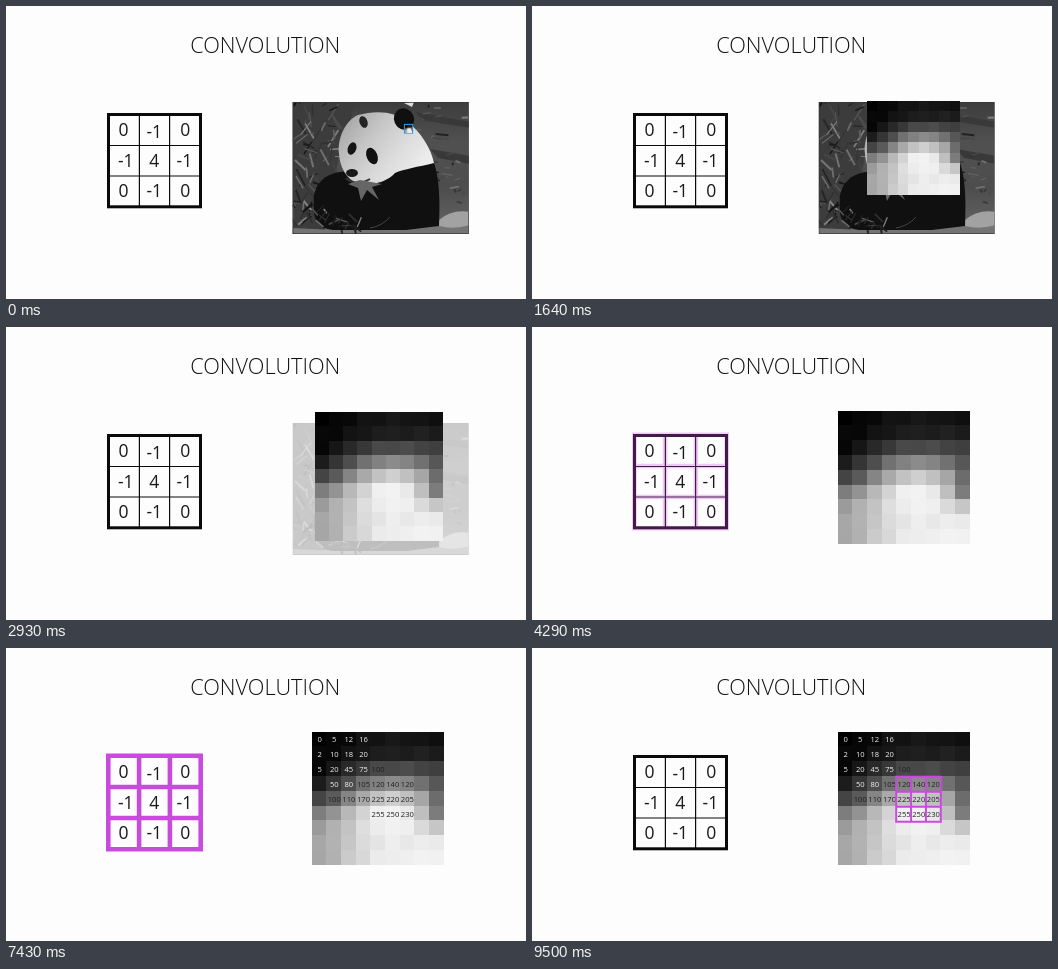
Animation of 520 by 293 pixels, one loop 10 s. Source, as an HTML page:

```html
<!DOCTYPE html>
<html lang="en">
<head>
<meta charset="utf-8">
<title>Convolution</title>
<style>
  html, body { margin: 0; width: 100%; height: 100%; overflow: hidden; background: #fefdfe; }
  svg { display: block; width: 520px; height: 293px; }
  text { font-family: "Open Sans", "Noto Sans", sans-serif; text-anchor: middle; }
</style>
</head>
<body>
<svg viewBox="0 0 520 293">
  <defs>
    <clipPath id="frame"><rect x="286.7" y="96" width="176" height="132"/></clipPath>
    <linearGradient id="ground" x1="0" y1="0" x2="0" y2="1">
      <stop offset="0" stop-color="#3c3c3c"/>
      <stop offset=".3" stop-color="#505050"/>
      <stop offset=".65" stop-color="#4d4d4d"/>
      <stop offset="1" stop-color="#686868"/>
    </linearGradient>
    <linearGradient id="fur" x1="0" y1="0" x2="1" y2=".6">
      <stop offset="0" stop-color="#9c9c9c"/>
      <stop offset=".4" stop-color="#c6c6c6"/>
      <stop offset=".7" stop-color="#dcdcdc"/>
      <stop offset="1" stop-color="#eee"/>
    </linearGradient>
    <linearGradient id="edge" gradientUnits="userSpaceOnUse" y1="0" y2="0">
      <stop offset="0" stop-color="#fff"/>
      <stop offset="1" stop-color="#000"/>
    </linearGradient>
    <mask id="wipe" maskUnits="userSpaceOnUse" x="300" y="80" width="145" height="140">
      <rect x="300" y="80" width="145" height="140" fill="url(#edge)"/>
    </mask>
  </defs>

  <rect width="520" height="293" fill="#fefdfe"/>
  <text x="259.2" y="46.8" font-size="21.75" font-weight="300" fill="#111">CONVOLUTION</text>

  <g id="photo" clip-path="url(#frame)">
    <rect x="286" y="95" width="178" height="134" fill="url(#ground)"/>
    <path d="M286 95H350L333 150 318 228H286Z" fill="#3c3c3c"/>
    <path d="M410 106L464 116V122L415 114ZM424 143L464 150V158L432 152Z" fill="#393939"/>
    <g id="leaves"></g>
    <path d="M286 228V222L330 224 400 221 433 214 464 208V228Z" fill="#747474"/>
    <path d="M433 214Q446 203 464 206V219Q448 224 433 220Z" fill="#a2a2a2"/>
    <path d="M334 166C318 168 306 180 308 198C306 214 314 224 330 224H400L433 220C434 198 434 172 427 154L380 160Z" fill="#101010"/>
    <path d="M333 148C331 132 340 114 352 109C370 104 390 105 403 117C415 127 425 142 428 157C412 161 398 163 389 167C380 177 364 180 352 177C340 174 334 160 333 148Z" fill="url(#fur)"/>
    <ellipse cx="398" cy="113" rx="10" ry="11" fill="#101010" transform="rotate(-25 398 113)"/>
    <path d="M398 97L408 96 406 101Z" fill="#ddd"/>
    <ellipse cx="357.5" cy="116" rx="4" ry="6" fill="#242424" transform="rotate(-20 357.5 116)"/>
    <ellipse cx="346" cy="142.5" rx="4.2" ry="6.5" fill="#151515" transform="rotate(20 346 142.5)"/>
    <ellipse cx="366" cy="150" rx="5.4" ry="8.5" fill="#111" transform="rotate(-22 366 150)"/>
    <ellipse cx="346" cy="167" rx="6" ry="4" fill="#191919"/>
    <path d="M340 172Q350 181 364 173" fill="none" stroke="#333" stroke-width="2"/>
    <path d="M342 178L354 174 376 178 366 181 373 194 361 184 355 195 352 182Z" fill="#666"/>
    <path d="M364 222Q376 220 384 211" fill="none" stroke="#444"/>
    <g id="grass"></g>
    <rect x="287" y="96.3" width="175.4" height="131.4" fill="none" stroke="#333" stroke-width=".7"/>
  </g>
  <rect id="pick" x="398.5" y="118.5" width="8" height="8.5" fill="none" stroke="#2f93d6" stroke-width="1.2"/>

  <g id="patch" shape-rendering="crispEdges"></g>
  <g id="values" font-size="7.6" mask="url(#wipe)"></g>

  <g fill="none" stroke="#0a0a0a">
    <rect x="102.5" y="108.5" width="92" height="92.3" stroke-width="3"/>
    <path d="M133.4 108V201M163.6 108V201M102 139.5H195M102 170H195" stroke-width="1.2"/>
  </g>
  <path id="grid" fill="none" stroke="#c94bdd"/>
  <g id="kernel" font-size="17.5" fill="#1a1a1a"></g>
</svg>

<script>
const LOOP = 10000;
const $ = id => document.getElementById(id);
const mix = (a, b, p) => a + (b - a) * p;
const span = (t, from, to) => Math.min(1, Math.max(0, (t - from) / (to - from)));
const smooth = p => p * p * (3 - 2 * p);

function add(parent, tag, attrs, text) {
  const el = document.createElementNS("http://www.w3.org/2000/svg", tag);
  for (const k in attrs) el.setAttribute(k, attrs[k]);
  if (text !== undefined) el.textContent = text;
  parent.appendChild(el);
}

// Cubic Bezier easing with a quick start and a long settle.
function settle(x) {
  const curve = (a, b, u) => 3 * a * u * (1 - u) ** 2 + 3 * b * u * u * (1 - u) + u ** 3;
  let lo = 0, hi = 1;
  for (let i = 0; i < 24; i++) {
    const mid = (lo + hi) / 2;
    if (curve(.16, .25, mid) < x) lo = mid; else hi = mid;
  }
  return curve(.1, 1, hi);
}

let seed = 11;
function rnd() {
  seed = (seed * 16807) % 2147483647;
  return seed / 2147483647;
}

function blades(group, count, x, y, w, h, rise) {
  for (let i = 0; i < count; i++) {
    const g = Math.round(mix(20, 135, rnd() ** 1.4));
    const px = x + rnd() * w, py = y + rnd() * h;
    add(group, "path", {
      d: `M${px} ${py}l${(rnd() - .4) * 22} ${(rnd() - .5) * rise}`,
      stroke: `rgb(${g},${g},${g})`, "stroke-width": mix(.7, 2.2, rnd())
    });
  }
}

// Each row of the enlarged area: left, brightest and right grey level.
const rows = [
  [0, 22, 14], [5, 30, 30], [8, 75, 62], [30, 138, 85], [65, 205, 110],
  [125, 245, 125], [158, 242, 195], [165, 235, 235], [165, 238, 243]
];
function buildPatch() {
  rows.forEach(([left, top, right], r) => {
    for (let c = 0; c < 9; c++) {
      const base = c <= 5
        ? mix(left, top, Math.sin(c / 5 * Math.PI / 2) ** 1.4)
        : mix(top, right, ((c - 5) / 3) ** 2);
      const g = Math.round(Math.max(0, Math.min(248, base + 3 * Math.sin(c * 2.7 + r * 1.9))));
      add($("patch"), "rect", { x: c, y: r, width: 1.02, height: 1.02, fill: `rgb(${g},${g},${g})` });
    }
  });
}

function buildValues() {
  const lines = [
    [0, 0, 5, 12, 16], [0, 2, 10, 18, 20], [0, 5, 20, 45, 75, 100],
    [1, 50, 80, 105, 120, 140, 120], [1, 100, 110, 170, 225, 220, 205], [4, 255, 250, 230]
  ];
  lines.forEach(([first, ...nums], r) => nums.forEach((n, i) =>
    add($("values"), "text", {
      x: 313.6 + (first + i) * 14.63, y: 94 + r * 14.9, fill: n < 100 ? "#f4f4f4" : "#202020"
    }, n)));
}

function buildKernel() {
  [[0, -1, 0], [-1, 4, -1], [0, -1, 0]].forEach((row, r) => row.forEach((n, c) =>
    add($("kernel"), "text", {
      x: [r === 1 ? 119.7 : 117.5, 148.3, r === 1 ? 178.4 : 179.2][c],
      y: [129.7, 160.7, 190.7][r] + (r === 0 && c === 1 ? 1.8 : 0)
    }, n)));
}

function gridPath(x, y, w, h) {
  let d = `M${x} ${y}h${w}v${h}h${-w}z`;
  for (const k of [1 / 3, 2 / 3]) d += `M${x + w * k} ${y}v${h}M${x} ${y + h * k}h${w}`;
  return d;
}

function draw(t) {
  const zoom = settle(span(t, 400, 3700));
  const x = mix(399, 305.5, zoom), y = mix(119, 83.7, zoom);
  const w = mix(406.3, 437.9, zoom) - x, h = mix(126.8, 216.7, zoom) - y;
  $("patch").setAttribute("transform", `translate(${x} ${y}) scale(${w / 9} ${h / 9})`);

  const shown = 1 - smooth(span(t, 1600, 3600));
  $("photo").setAttribute("opacity", shown);
  $("pick").setAttribute("opacity", zoom > .1 ? 0 : 1);

  const front = mix(304, 418, span(t, 4300, 5400));
  $("edge").setAttribute("x1", front - 8);
  $("edge").setAttribute("x2", front + 2);

  const move = settle(span(t, 7930, 9380));
  $("grid").setAttribute("d", gridPath(
    mix(102.3, 364.2, move), mix(107.8, 128.8, move),
    mix(92.4, 44.6, move), mix(93.4, 45, move)));
  $("grid").setAttribute("stroke-width", mix(4.6, 2, move));
  $("grid").setAttribute("opacity", smooth(span(t, 3900, 5000)));
}

blades($("leaves"), 95, 287, 96, 42, 128, 34);
blades($("leaves"), 40, 405, 98, 58, 120, 6);
blades($("grass"), 24, 290, 204, 62, 22, 22);
buildPatch();
buildValues();
buildKernel();

const start = performance.now();
function tick() {
  draw((performance.now() - start) % LOOP);
  requestAnimationFrame(tick);
}
tick();
</script>
</body>
</html>
```
